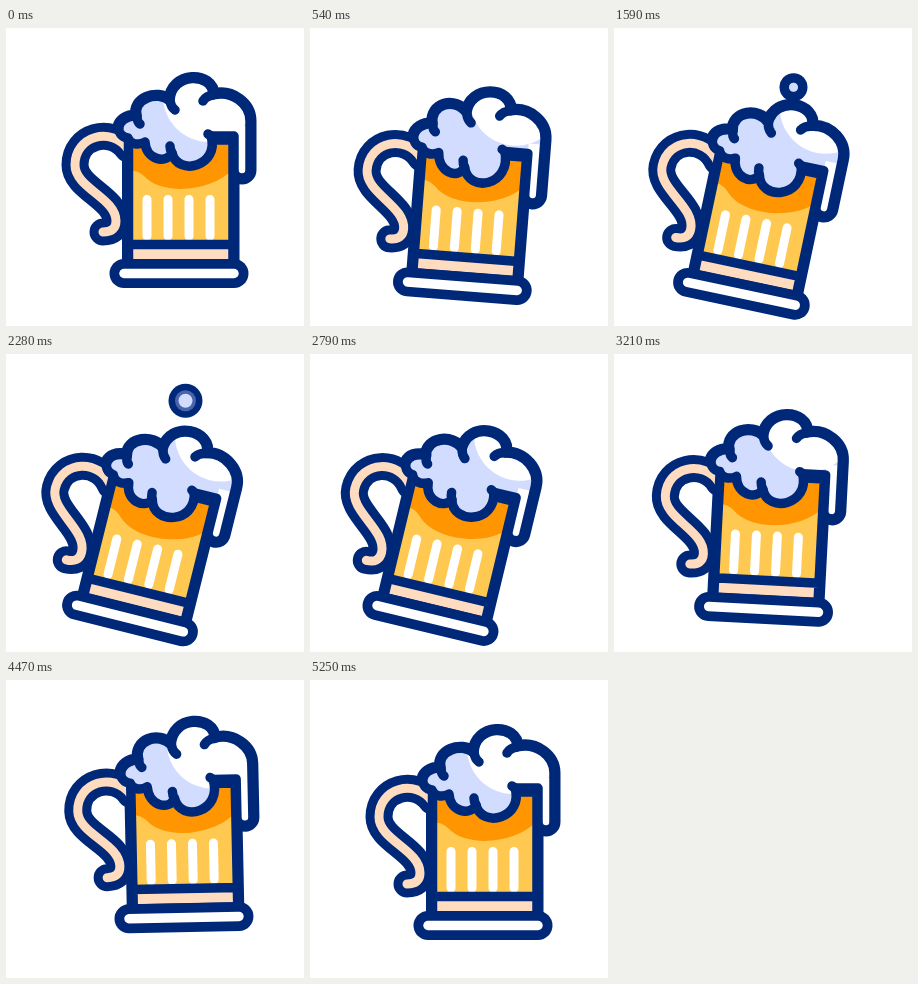
Animation, 298 px wide and 298 px high, one loop 5400 ms. Source, as an HTML page:

```html
<!DOCTYPE html>
<html lang="en">
<head>
<meta charset="utf-8">
<title>Beer mug</title>
<style>
html, body { margin: 0; height: 100%; overflow: hidden; background: #fff; }
svg { display: block; width: 100vw; height: 100vh; }
.line { fill: none; stroke: #002878; stroke-width: 9.5; stroke-linecap: round; stroke-linejoin: round; }
.edge { fill: #002878; stroke: #002878; stroke-width: 13; stroke-linejoin: round; }
</style>
</head>
<body>
<svg viewBox="0 0 298 298">
  <defs>
    <path id="handle" d="M122 121C105 98 69 108 69 137C69 160 110 170 110 193Q110 204 97 204" fill="none" stroke-linecap="round"/>
    <path id="body" d="M122.5 112H227V236H122.5Z"/>
    <path id="foam"/>
    <clipPath id="inFoam"><use href="#foam"/></clipPath>
    <clipPath id="inBody"><use href="#body"/></clipPath>
  </defs>
  <g id="bubble">
    <circle id="rim" fill="#002878"/>
    <circle id="halo" fill="#4864ac"/>
    <circle id="core" fill="#d2dcff"/>
  </g>
  <g id="mug">
    <use href="#handle" stroke="#002878" stroke-width="27"/>
    <use href="#body" class="edge"/>
    <use href="#foam" class="edge"/>
    <use href="#handle" stroke="#ffdcc0" stroke-width="9"/>
    <g clip-path="url(#inBody)">
      <use href="#body" fill="#ffc850"/>
      <path d="M122 112H227V141C206 164 156 168 138 148Q132 142 122 142Z" fill="#ff9500"/>
      <path d="M141 171.500V208M162 171.500V208M183 171.500V208M204 171.500V208" stroke="#fff" stroke-width="9" stroke-linecap="round"/>
      <path d="M122 217H228V236H122Z" fill="#ffdcc0"/>
    </g>
    <path class="line" d="M122.500 112H227V236H122.500ZM122 216.500H227"/>
    <path d="M118 245.500H228" stroke="#002878" stroke-width="29" stroke-linecap="round"/>
    <path d="M118 245.500H228" stroke="#fff" stroke-width="9.500" stroke-linecap="round"/>
    <g clip-path="url(#inFoam)">
      <use href="#foam" fill="#d2dcff"/>
      <circle id="light" r="46" fill="#fff"/>
      <path d="M236 98V170" stroke="#fff" stroke-width="16"/>
    </g>
    <use href="#foam" class="line"/>
    <path id="folds" class="line"/>
  </g>
</svg>
<script>
const LOOP = 5400;
const $ = id => document.getElementById(id);
const set = (id, attrs) => { for (const k in attrs) $(id).setAttribute(k, attrs[k]); };
const clamp = (v, lo, hi) => Math.min(hi, Math.max(lo, v));

// time, base centre x, base centre y, tilt in degrees, foam swell
const poses = [
  [0, 173, 245.5, 0, 0], [180, 173, 245.5, 0, 0], [720, 141, 264, 7, .7],
  [960, 134, 266, 8.7, .8], [1290, 129.5, 266, 10.5, .5], [1860, 126, 265.5, 13, 0],
  [2280, 124, 264.5, 14, 0], [2650, 118, 265, 15, 0], [3030, 131.5, 262, 8, 0],
  [3210, 149.5, 255.5, 3, .1], [3570, 172, 235, -5, .7], [3750, 181.5, 222.5, -8, 1],
  [3900, 184, 213, -9, 1], [4170, 182.5, 221, -5.5, .7], [4470, 178, 237.5, -1.2, .3],
  [4720, 174, 248.5, .8, .05], [5250, 173, 245.5, 0, 0], [5400, 173, 245.5, 0, 0]
];

// slope at pose i; flat where the motion turns
function slope(i, k) {
  const a = poses[i - 1], b = poses[i], c = poses[i + 1];
  if (!a || !c) return 0;
  const s = (b[k] - a[k]) / (b[0] - a[0]), e = (c[k] - b[k]) / (c[0] - b[0]);
  return s * e > 0 ? 2 * s * e / (s + e) : 0;
}

function valueAt(t, k) {
  const i = poses.findIndex(p => p[0] > t) - 1, a = poses[i], b = poses[i + 1];
  const d = b[0] - a[0], u = (t - a[0]) / d, v = 1 - u;
  return v * v * (1 + 2 * u) * a[k] + u * u * (3 - 2 * u) * b[k]
    + d * u * v * (v * slope(i, k) - u * slope(i + 1, k));
}

function drawFoam(swell, tilt) {
  const up = 10 * swell, down = 8 * swell, drip = 142 + 15 * swell;
  set('foam', { d: `M122 110C109 109 108 88 131 ${88 - up / 2}
    C127 ${71 - up} 151 ${62 - up} 164 73C165 44 207 44 207 67C226 62 244 76 244 93
    V${drip}a8 8 0 0 1 -16 0V108H205C214 ${138 + down} 172 ${149 + down} 166 ${125 + down / 2}
    C160 ${136 + down} 140 ${132 + down / 2} 139 114C132 118 124 116 122 110Z` });
  set('folds', { d: `M131 ${88 - up / 2}q0 6 3 8M164 73q1 6 5 9M207 67q-7 1 -10 6
    M166 ${125 + down / 2}q-2 -3 -2 -7M205 108l-3 -2` });
  set('light', { cx: 203 + Math.min(14, Math.abs(tilt) * 2), cy: 68 - clamp(tilt * 2.8, -25, 22) });
}

function drawBubble(t) {
  const age = (t - 870) % 640;
  const visible = t > 870 && t < 2430 && age < 260;
  set('bubble', { transform: `translate(179.5 ${79.5 - age / 4})`, visibility: visible ? 'visible' : 'hidden' });
  if (!visible) return;
  const grow = clamp((age - 90) / 40, 0, 1);
  set('rim', { r: 14 + 3 * grow });
  set('halo', { r: 4.5 + 6 * grow });
  set('core', { r: 4.5 + 2.5 * grow });
}

function draw(now) {
  const t = now % LOOP;
  const [x, y, tilt, swell] = [1, 2, 3, 4].map(k => valueAt(t, k));
  set('mug', { transform: `translate(${x} ${y}) rotate(${tilt}) translate(-173 -245.5)` });
  drawFoam(swell, tilt);
  drawBubble(t);
}

const start = performance.now();
function tick() {
  draw(performance.now() - start);
  requestAnimationFrame(tick);
}
tick();
</script>
</body>
</html>
```
